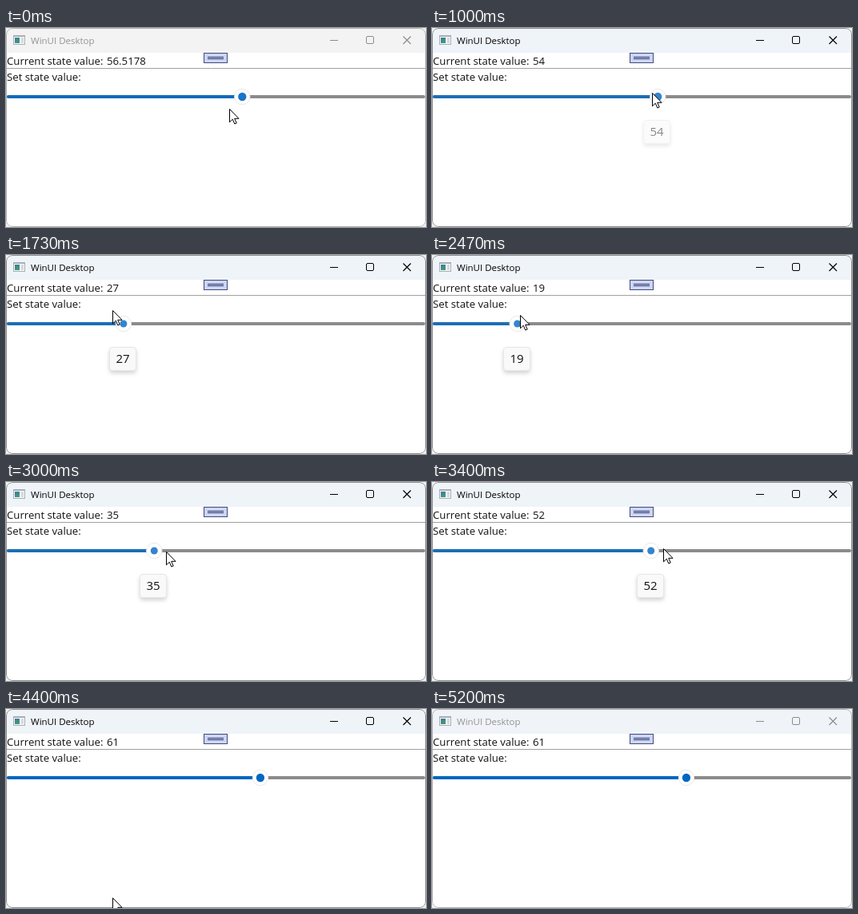
Recreate the animation shown at these times as an HTML page. Size 525 by 249 pixels, loop 5.39 s.

```html
<!DOCTYPE html>
<html lang="en">
<head>
<meta charset="utf-8">
<title>Slider demo</title>
<style>
  html, body { margin: 0; width: 100%; height: 100%; overflow: hidden; background: #f0f0f0; }
  svg { display: block; width: 525px; height: 249px; }
  text { font: 13.2px "Open Sans", "Noto Sans", sans-serif; fill: #111; }
  .title { font-size: 11.5px; fill: #000; }
  .tip { font-size: 15px; text-anchor: middle; }
  .caption { fill: none; stroke: #000; }
  .inactive .title { fill: #939393; }
  .inactive .caption { stroke: #8c8c8c; }
  .frame { fill: none; stroke: #8e8e8e; }
  .inactive .frame { stroke: #b0b0b0; }
  .bubble { filter: drop-shadow(0 3px 2.5px rgba(0, 0, 0, .17)); }
</style>
</head>
<body>
<svg id="stage" viewBox="0 0 525 249">
  <defs>
    <clipPath id="window"><rect width="525" height="249" rx="8"/></clipPath>
    <linearGradient id="pane" x2="0.4" y2="1">
      <stop stop-color="#3f78a8"/>
      <stop offset="1" stop-color="#3f9a78"/>
    </linearGradient>
  </defs>
  <g clip-path="url(#window)">
    <rect width="525" height="249" fill="#fff"/>
    <rect id="bar" width="525" height="31"/>

    <g shape-rendering="crispEdges">
      <rect x="9" y="9" width="15" height="12" fill="#a9aeb2"/>
      <rect x="10" y="11" width="13" height="9" fill="#f8f9fa"/>
      <rect x="11" y="12" width="6" height="7" fill="url(#pane)"/>
      <rect x="19" y="12" width="3" height="7" fill="#d5dade"/>
    </g>
    <text class="title" x="31" y="20">WinUI Desktop</text>
    <g class="caption">
      <path d="M405 15.5h10"/>
      <rect x="450.5" y="10.5" width="9" height="9" rx="1.5"/>
      <path d="M496.5 10.5l9.5 9.5m0-9.5l-9.5 9.5" stroke-width="1.15"/>
    </g>

    <text x="1" y="46">Current state value:</text>
    <text id="value" x="126" y="46"></text>
    <path d="M0 50.5h525" stroke="#a0a0a0"/>
    <text x="1" y="66">Set state value:</text>

    <rect x="247.5" y="31.5" width="29" height="12" fill="#ccd5f3" stroke="#434b7c"/>
    <path d="M252 36.5h20m-20 2h20" stroke="#2c3566"/>

    <rect x="1" y="84" width="523" height="4" rx="2" fill="#8b8b8b"/>
    <rect id="fill" x="1" y="84" height="4" rx="2"/>
    <g id="thumb">
      <circle r="9.7" fill="#fff" stroke="#e8e8e8"/>
      <circle id="dot"/>
    </g>

    <g id="tip">
      <rect class="bubble" x="-16.5" y="115.5" width="33" height="29" rx="3.5" fill="#f9f9f9" stroke="#e7e7e7"/>
      <text id="tipText" class="tip" x="0" y="135"></text>
    </g>
    <rect class="frame" x=".5" y=".5" width="524" height="248" rx="7.5"/>
    <path id="cursor" d="M.5 .5V16.8L4.3 13.2L6.8 19L9.2 18L6.7 12.3H12Z" fill="#fff" stroke="#000"/>
  </g>
</svg>
<script>
const LOOP = 5390, STEP = 200 / 3;
const PRESS = 798, RELEASE = 3860, GONE = 4590, BLUR = 5195;
const $ = id => document.getElementById(id);

const smooth = p => p * p * (3 - 2 * p);
// Speeds up over the first part `a`, then keeps its speed
const ramp = a => p => (p < a ? p * p / (2 * a) : p - a / 2) / (1 - a / 2);
const brake = p => 1 - ramp(.47)(1 - p);

const progress = (t, start, end) => Math.min(1, Math.max(0, (t - start) / (end - start)));
const move = (t, start, end, amount, ease = smooth) => amount * ease(progress(t, start, end));

const valueAt = t => 56.5178
  + move(t, 733, 1933, -37.7, ramp(.47))
  + move(t, 2400, 3600, 42.2, ramp(.4));
const thumbX = value => 11 + 5.03 * value;
const dotRadius = t => 5.15 + move(t, 400, 600, 1.85)
  + move(t, 733, 1133, -2.5) + move(t, 3867, 4067, .65);
const tipOpacity = t => move(t, 867, 1133, 1) - move(t, 3867, 4067, 1);

function cursorX(t) {
  if (t < 667) {
    const p = progress(t, 133, 667);
    return 279 + 16 * p * p - 8 * Math.sin(Math.PI * p);
  }
  // While dragging, the thumb trails the pointer by one step
  return thumbX(valueAt(t + STEP)) + .3 + move(t, 3867, 4533, -196, brake);
}

const cursorY = t => 101 + move(t, 133, 667, -17)
  + move(t, 733, 1733, -15) + move(t, 1733, 1933, 6)
  + move(t, 2400, 3000, 12) + move(t, 3000, 3600, -5)
  + move(t, 3867, 4533, 163, brake);

function set(id, attrs) {
  for (const name in attrs) $(id).setAttribute(name, attrs[name]);
}

function draw(now) {
  // The picture advances 15 times per second
  const t = Math.floor((now % LOOP + 4) / STEP) * STEP;
  const value = valueAt(t), x = thumbX(value);
  const [track, dot] = t < PRESS ? ['#0e6bbb', '#1a76c6']
    : t < RELEASE ? ['#1c6eb6', '#3385cd'] : ['#0067c0', '#0067c0'];

  $('stage').classList.toggle('inactive', t < PRESS || t >= BLUR);
  set('bar', { fill: t < PRESS ? '#f3f3f3' : t < BLUR ? '#eff4f9' : '#f0f3f8' });
  set('fill', { width: x - 1, fill: track });
  set('thumb', { transform: `translate(${x} 86)` });
  set('dot', { r: dotRadius(t), fill: dot });
  set('tip', { transform: `translate(${Math.round(x - 1)} 0)`, opacity: tipOpacity(t) });
  set('cursor', {
    transform: `translate(${Math.round(cursorX(t))} ${Math.round(cursorY(t))})`,
    visibility: t < GONE ? 'visible' : 'hidden'
  });
  $('value').textContent = t < PRESS ? '56.5178' : Math.round(value);
  $('tipText').textContent = Math.round(value);
}

const start = performance.now();
function tick() {
  draw(performance.now() - start);
  requestAnimationFrame(tick);
}
tick();
</script>
</body>
</html>
```
